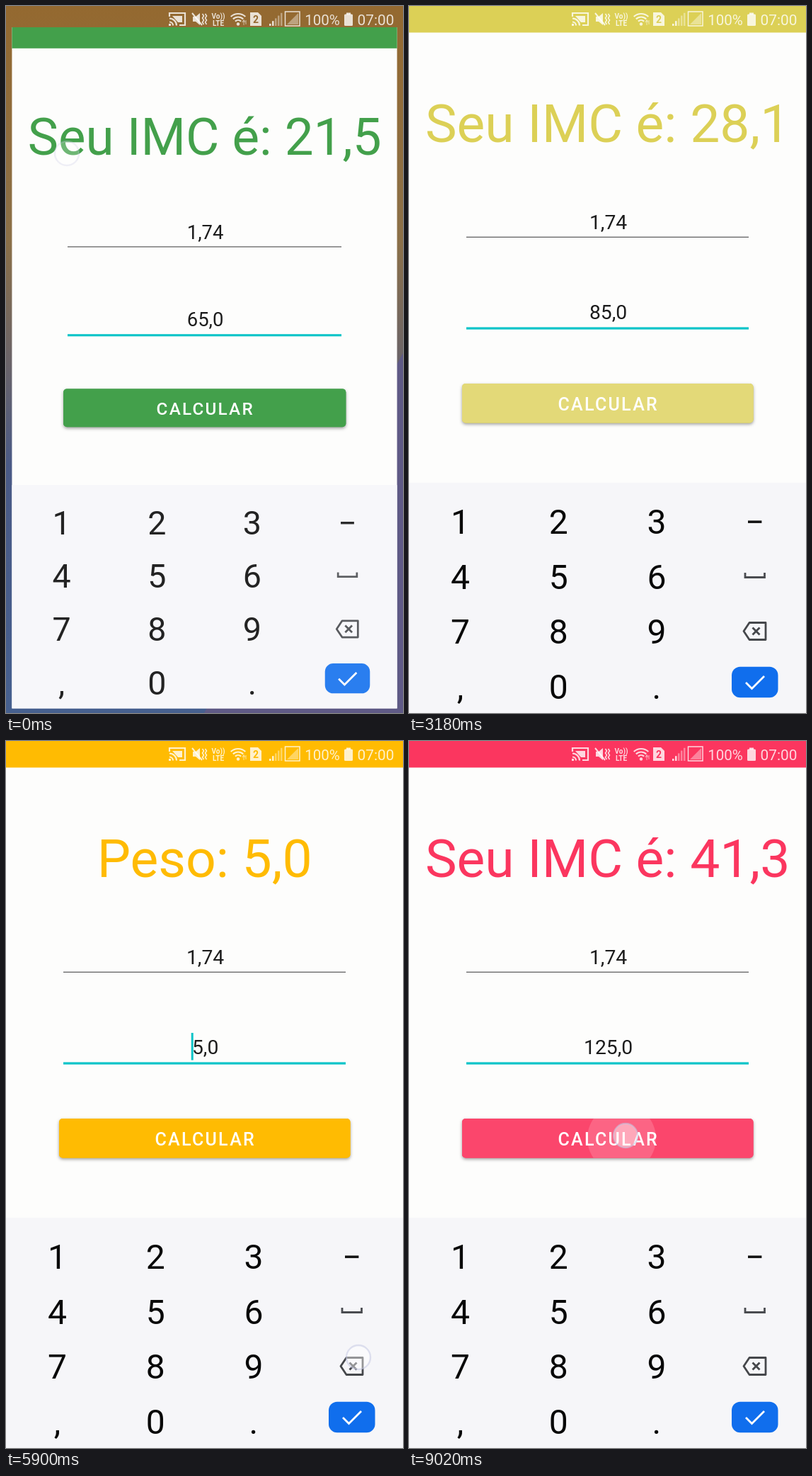
An HTML page with a canvas for the animation above (9.05 s loop, 561 by 998 pixels).

```html
<!DOCTYPE html>
<html lang="pt">
<head>
<meta charset="utf-8">
<style>
html, body { margin: 0; width: 561px; height: 998px; overflow: hidden; }
canvas { display: block; }
</style>
</head>
<body>
<canvas id="stage" width="561" height="998"></canvas>
<script>
const ctx = document.getElementById('stage').getContext('2d');
const LOOP = 9050, W = 561, H = 998, HEIGHT = 1.74, KEY_W = 138.75;
const KEY_ROWS = ['123', '456', '789', ',0.'];
const LEVELS = [[25, '#43a04b'], [30, '#dcd056'], [35, '#ffbb02'], [40, '#ff5630'], [99, '#fb365f']];

// Taps: time down, time up, action, finger position
const TAPS = [
  [-250, -90, 'none', 86, 208],
  [1690, 1770, 'del', 490, 880],
  [2130, 2210, '8', 214, 885],
  [2700, 2790, 'calc', 300, 560],
  [3840, 3925, 'del', 492, 878],
  [4450, 4540, '9', 352, 884],
  [4940, 5030, 'calc', 302, 560],
  [5805, 5860, 'del', 498, 870],
  [6500, 6570, '1', 74, 730],
  [6760, 6840, '1', 74, 730],
  [7200, 7290, 'calc', 303, 558],
  [7890, 7970, 'del', 501, 880],
  [8300, 8375, '2', 212, 732],
  [8895, 8985, 'calc', 306, 557]
].map(([down, up, act, x, y]) => ({ down, up, act, x, y }));

const clamp = v => Math.max(0, Math.min(1, v));
const lerp = (a, b, p) => a + (b - a) * p;
const easeOut = p => 1 - (1 - clamp(p)) ** 2;

function rect(x, y, w, h, color) {
  ctx.fillStyle = color;
  ctx.fillRect(x, y, w, h);
}

function roundRect(x, y, w, h, r, color) {
  ctx.beginPath();
  ctx.roundRect(x, y, w, h, r);
  ctx.fillStyle = color;
  ctx.fill();
}

function disc(x, y, r, color) {
  ctx.beginPath();
  ctx.arc(x, y, r, 0, Math.PI * 2);
  ctx.fillStyle = color;
  ctx.fill();
}

function polygon(points, color) {
  ctx.beginPath();
  points.forEach(([x, y]) => ctx.lineTo(x, y));
  ctx.fillStyle = color;
  ctx.fill();
}

function path(points, width, color, closed) {
  ctx.beginPath();
  points.forEach(([x, y]) => ctx.lineTo(x, y));
  if (closed) ctx.closePath();
  ctx.lineWidth = width;
  ctx.strokeStyle = color;
  ctx.stroke();
}

function label(text, x, y, size, color, weight = 400) {
  ctx.font = `${weight} ${size}px Roboto, sans-serif`;
  ctx.textAlign = 'center';
  ctx.fillStyle = color;
  ctx.fillText(text, x, y);
}

function stateAt(t) {
  const s = { prefix: '6', title: '', color: '', edited: 900 };
  const calc = () => {
    const bmi = parseFloat(s.prefix + '5') / HEIGHT ** 2;
    s.title = 'Seu IMC é: ' + String(Math.round(bmi * 10) / 10).replace('.', ',');
    s.color = LEVELS.find(([limit]) => bmi < limit)[1];
  };
  calc();
  for (const tap of TAPS) {
    if (tap.up > t || tap.act === 'none') continue;
    if (tap.act === 'calc') { calc(); continue; }
    s.prefix = tap.act === 'del' ? s.prefix.slice(0, -1) : s.prefix + tap.act;
    s.title = `Peso: ${s.prefix}5,0`;
    s.edited = tap.up;
  }
  const age = t - s.edited;
  s.caret = age >= 0 && age % 1000 < 505;
  return s;
}

function drawButton(t, color) {
  ctx.save();
  ctx.shadowColor = 'rgba(0,0,0,.38)';
  ctx.shadowBlur = 4;
  ctx.shadowOffsetY = 2;
  roundRect(75, 533, 411.5, 55.5, 5, color);
  ctx.restore();

  ctx.save();
  roundRect(75, 533, 411.5, 55.5, 5, color);
  ctx.clip();
  for (const tap of TAPS) {
    const age = t - tap.down;
    if (tap.act !== 'calc' || age < 0 || age > 720) continue;
    const fade = 1 - clamp((age - 330) / 380);
    const r = age < 120 ? 43 * age / 120 : 43 + 164 * easeOut((age - 120) / 350);
    const x = lerp(tap.x - 4, 280.5, easeOut((age - 120) / 170));
    rect(75, 533, 412, 56, `rgba(255,255,255,${0.18 * clamp(age / 290) * fade})`);
    disc(x, 561, r, `rgba(255,255,255,${0.16 * fade})`);
  }
  ctx.restore();
  ctx.letterSpacing = '2.25px';
  label('CALCULAR', 281.7, 570.5, 25, '#fff', 500);
  ctx.letterSpacing = '0px';
}

function keyCell(act) {
  if (act === 'del') return [3, 2];
  const row = KEY_ROWS.findIndex(keys => keys.includes(act));
  return [KEY_ROWS[row].indexOf(act), row];
}

function drawKeyboard(t) {
  rect(0, 673, W, H - 673, '#f6f6f9');
  for (const tap of TAPS) {
    if (t < tap.down || t >= tap.up || tap.act === 'calc') continue;
    const [col, row] = keyCell(tap.act);
    roundRect(4 + col * KEY_W, 691 + row * 77.3, KEY_W - 2, 75, 5, '#dfe2e7');
  }
  KEY_ROWS.forEach((keys, row) => [...keys].forEach((key, col) =>
    label(key, 72.4 + col * KEY_W, 745 + row * 77.5, 48, '#080808')));
  rect(479, 726.4, 19.4, 3.5, '#111');
  path([[475, 800], [475, 806.5], [502.5, 806.5], [502.5, 800]], 2.8, '#4a4c50');
  ctx.lineJoin = 'round';
  path([[473, 882.5], [481, 870.5], [504, 870.5], [504, 894.5], [481, 894.5]], 2.8, '#45474b', true);
  path([[485.5, 877.5], [495.5, 887.5]], 2.8, '#45474b');
  path([[495.5, 877.5], [485.5, 887.5]], 2.8, '#45474b');
  ctx.lineJoin = 'miter';
  roundRect(456, 932.7, 65.5, 43.5, 12, '#106eed');
  path([[476, 955], [484.5, 963.5], [502, 946]], 2.8, '#fff');
}

function drawApp(t, s) {
  rect(0, 0, W, H, '#fdfdfc');
  rect(0, 0, W, 37.5, s.color);
  label(s.title, 280.7, 192, 75, s.color);
  label('1,74', 281.6, 315, 28.3, '#1c1c1c');
  rect(81, 325.6, 399, 1.4, '#6c6c6c');
  label(s.prefix + '5,0', 281.6, 442, 28.3, '#1c1c1c');
  rect(81, 453.4, 399, 3.2, '#0bc4c8');
  if (s.caret) {
    const start = 281.6 - ctx.measureText(s.prefix + '5,0').width / 2;
    rect(start + ctx.measureText(s.prefix).width - 1.2, 412, 3, 38.5, '#0bc4c8');
  }
  drawButton(t, s.color);
  drawKeyboard(t);
}

function arcs(x, y, radii, from, to, width, color) {
  ctx.lineWidth = width;
  ctx.strokeStyle = color;
  for (const r of radii) {
    ctx.beginPath();
    ctx.arc(x, y, r, from * Math.PI, to * Math.PI);
    ctx.stroke();
  }
}

function drawStatus(t, color) {
  const ink = 'rgba(255,255,255,.8)', dim = 'rgba(255,255,255,.38)';
  // Screen cast
  path([[231, 15], [231, 10], [253, 10], [253, 27], [245, 27]], 2.2, ink);
  arcs(231, 27.5, [5, 10], 1.5, 2, 2.2, ink);
  rect(230, 25, 3, 3, ink);
  polygon([[235, 14], [249, 14], [249, 23], [243, 23]], ink);
  // Muted speaker with vibration marks
  polygon([[264, 15], [268, 15], [274, 10], [274, 27], [268, 22], [264, 22]], ink);
  path([[263, 10], [277, 27]], 2, ink);
  for (const x of [277.5, 281.5])
    path([[x, 11], [x + 2, 14], [x, 17], [x + 2, 20], [x, 23], [x + 2, 26]], 1.6, ink);
  label('Vo))', 300, 18, 10, ink, 700);
  label('LTE', 300, 28, 10, ink, 700);
  // Wi-Fi and its traffic arrows
  disc(328, 25.5, 2.2, ink);
  arcs(328, 26, [6, 10.5, 15], 1.26, 1.74, 2.2, ink);
  const sending = t > 500 && t < 1420;
  path([[334, 23], [336, 20], [338, 23]], 1.7, sending ? ink : dim);
  path([[336, 20], [336, 27]], 1.5, sending ? ink : dim);
  path([[339, 20], [339, 26]], 1.5, dim);
  // SIM card
  polygon([[345, 9], [356, 9], [361, 14], [361, 28], [345, 28]], ink);
  label('2', 353, 24, 14, color, 700);
  // Signal strength
  for (let i = 0; i < 5; i++) {
    const h = 3 + i * 3.8;
    rect(372 + i * 4, 28 - h, 2.5, h, i < 2 ? ink : dim);
  }
  ctx.strokeStyle = ink;
  ctx.lineWidth = 1.5;
  ctx.strokeRect(394.5, 8, 20.5, 20);
  polygon([[397, 26], [413, 10], [413, 26]], dim);
  label('100%', 447, 26.5, 20.5, ink);
  // Battery
  rect(481, 9.5, 6, 3, ink);
  roundRect(478, 11.5, 12, 16.5, 1.5, ink);
  label('07:00', 522.5, 26.5, 20.8, ink);
}

function drawWallpaper() {
  const g = ctx.createLinearGradient(0, 0, 0, H);
  [[0, '#946930'], [0.33, '#8b7048'], [0.5, '#6b6468'], [0.65, '#4a5a86'], [1, '#46608f']]
    .forEach(stop => g.addColorStop(...stop));
  rect(0, 0, W, H, g);
  polygon([[W, 490], [W, H], [280, H]], '#5f5a86');
}

function drawTouches(t) {
  for (const tap of TAPS) {
    if (t < tap.down || t > tap.up + 150) continue;
    ctx.globalAlpha = 1 - clamp((t - tap.up) / 150);
    disc(tap.x, tap.y, 17, 'rgba(255,255,255,.58)');
    ctx.strokeStyle = 'rgba(195,198,226,.7)';
    ctx.lineWidth = 2.4;
    ctx.stroke();
    ctx.globalAlpha = 1;
  }
}

function draw(t) {
  const s = stateAt(t);
  const open = easeOut((t - 50) / 300);
  const scale = lerp(0.97, 1, open);
  if (open < 1) drawWallpaper();
  ctx.save();
  ctx.beginPath();
  ctx.rect(0, lerp(30, 0, open), W, H);
  ctx.clip();
  ctx.translate(280.5 * (1 - scale), lerp(23.4, 0, open));
  ctx.scale(scale, scale);
  drawApp(t, s);
  if (open < 1) rect(0, 673, W, H - 673, `rgba(255,255,255,${0.11 * (1 - open)})`);
  ctx.restore();
  drawStatus(t, open < 0.5 ? '#946930' : s.color);
  drawTouches(t);
}

function loop() {
  draw(performance.now() % LOOP);
  requestAnimationFrame(loop);
}
loop();
</script>
</body>
</html>
```
